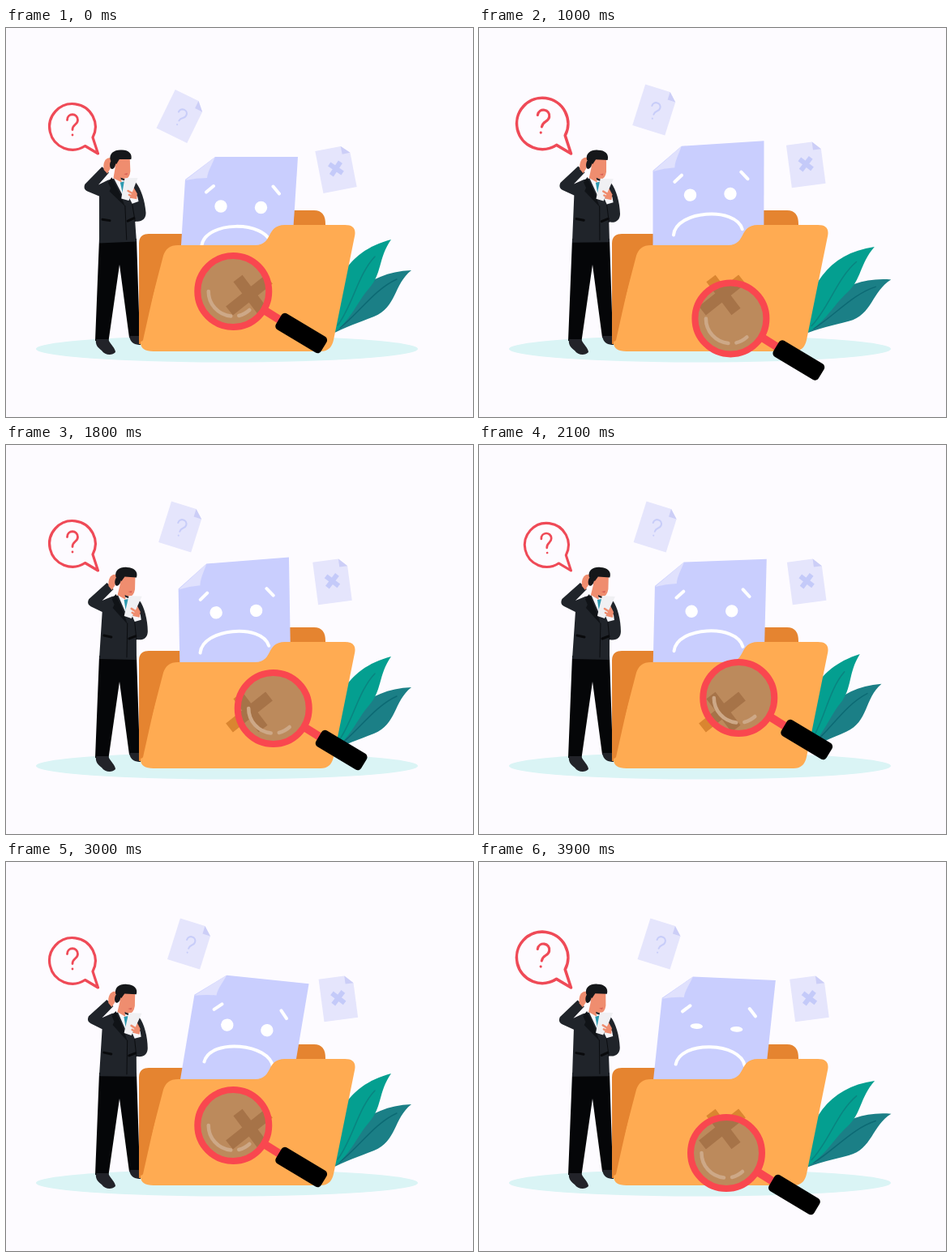
An HTML page for the animation above (4000 ms loop, 576x480 px).

```html
<!DOCTYPE html>
<html lang="en">
<head>
<meta charset="utf-8">
<title>File not found</title>
<style>
html, body { margin: 0; width: 100%; height: 100%; overflow: hidden; background: #fdfbff; }
svg { display: block; }
.line { fill: none; stroke-linecap: round; stroke-linejoin: round; }
</style>
</head>
<body>
<svg width="576" height="480" viewBox="0 0 576 480">
  <defs>
    <path id="question" class="line" d="M-6.5 -7C-6.5 -16 6.5 -16 6.5 -7C6.5 -1 0 -2 0 5M0 11.5h.01"/>
    <g id="sheet">
      <path fill="#e5e5fc" d="M-21 -26.5H11L21 -16.5V26.5H-21Z"/>
      <path fill="#cccef7" d="M11 -26.5V-16.5H21Z"/>
    </g>
  </defs>

  <ellipse cx="272.500" cy="396" rx="235.500" ry="16.5" fill="#daf4f5"/>

  <g id="bubble" class="line" stroke="#ef4a57" stroke-width="3.2">
    <path d="M97.500 145.500A28.300 28.300 0 1 1 107 135L113.5 155Z"/>
    <use id="doubt" href="#question" stroke-width="2.8"/>
  </g>

  <g id="leftSheet">
    <use href="#sheet"/>
    <use href="#question" transform="translate(0 2) scale(.8)" stroke="#c8cdf9" stroke-width="2.6"/>
  </g>
  <g id="rightSheet">
    <use href="#sheet"/>
    <path d="M-7 -7.500L7 6.500M7 -7.500L-7 6.500" stroke="#c4caf9" stroke-width="6"/>
  </g>

  <g id="leaves">
    <path fill="#1b7f86" d="M398 380C414 340 442 301 500 299C478 316 482 345 454 356C434 364 420 368 398 380Z"/>
    <path class="line" stroke="#0c6a74" stroke-width="1.5" d="M482 310C455 322 435 352 412 370"/>
    <path fill="#049f90" d="M398 380C398 320 418 276 475 261C459 284 464 303 448 321C432 339 424 365 398 380Z"/>
    <path class="line" stroke="#0a8480" stroke-width="1.5" d="M455 282C434 304 427 344 409 367"/>
  </g>

  <path fill="#050608" d="M115 260H161L165 382H152L140 292L126.500 386H110Z"/>
  <path fill="#222329" d="M111 384H126C129 391 135 395 135 400C131 404.500 122 404 118 398C113 394 110 391 111 384ZM152 380H166V391C160 391 153 389 152 380Z"/>
  <g id="torso">
    <path fill="#20242a" d="M125 170L102.500 190Q99.500 196 105 199L119 206L115 264L161 265L161 240C169 242 175 238 175 230C175 216 171 200 165 192L146 184L131 187L119 192L133 178Z"/>
    <path fill="#f6f6fa" d="M138 184L151 189L158 190L150 212Z"/>
    <path fill="#2c9ab0" d="M146 191L151 190L154 210L149 211Z"/>
    <path fill="#101317" d="M136 184L131 190L134 197L132 201L150 221L145 205Z"/>
    <path fill="#ef8d6f" d="M142 161H160L159.500 178Q158 187 152 187L147 185L148 191L138 185L141 173Z"/>
    <path fill="#d85f55" d="M151 181L156 180L155 182.500Z"/>
    <path fill="#ef8d6f" d="M127 174C126 165 130 158 137 160L135 173L131 179Z"/>
    <path fill="#15171a" d="M136 163C134 154 142 150 150 151C158 151 164 156 161.500 163.500L147 162.500L143 168Z"/>
    <ellipse cx="138.500" cy="167.500" rx="3.500" ry="6.500" transform="rotate(15 138.500 167.500)" fill="#15171a"/>
    <path fill="#f6f6fa" d="M156 211L166 209L167 216L159 218Z"/>
    <path fill="#ef8d6f" d="M156 198L161 196L166 206L165 213L157 211Z"/>
    <path fill="#f0f0f3" d="M152 186L168 187L161.500 201L155 214L146 211Z"/>
    <path class="line" stroke="#ef8d6f" stroke-width="2.500" d="M155 202L161 206M156 207L161 210"/>
    <path class="line" stroke="#090a0c" stroke-width="3" d="M121 235L130 237M152 239L160 236"/>
    <path class="line" stroke="#0b0d10" d="M150 220L149 262M159 219L161 240"/>
  </g>

  <path fill="#e58430" d="M164 390V266Q164 254 176 254H320L345 225H380Q394 225 394 242V300L210 390Z"/>

  <g id="page">
    <path fill="#c9cefe" d="M258 143H360L350 300H213L221 171Z"/>
    <path fill="#e0e1fd" d="M258 143C254 153 249 160 248 169Q235 169 221 172Z"/>
    <path class="line" stroke="#fff" stroke-width="4" d="M247 186.500L256 179M329.500 179.500L337 188.500M241.500 252C246 222 320 221 326.500 250"/>
    <g fill="#fff">
      <ellipse class="eye" cx="265" cy="204" rx="7.700"/>
      <ellipse class="eye" cx="314.500" cy="205.500" rx="7.700"/>
    </g>
  </g>

  <path fill="#ffab52" d="M182 399Q166 399 166 388L194 281Q198 268 212 268H307C330 268 320 243 344 243H418Q433 243 430 257L404 385Q401 399 388 399Z"/>
  <path fill="#e58430" d="M164 380V300L188 300L169 385Q166 390 164 380Z"/>
  <path fill="none" stroke="#da8530" stroke-width="14" d="M275.500 349L324.500 310M286 309L317 350"/>

  <g id="glass">
    <path stroke="#f9474f" stroke-width="10" d="M38 23L62 38"/>
    <rect x="66" y="-10.500" width="65" height="23" rx="5" transform="rotate(31)"/>
    <circle r="44" fill="#58586b" fill-opacity=".4" stroke="#f9474f" stroke-width="8"/>
    <path class="line" stroke="#cda887" stroke-width="4.500" d="M-30.500 0A30.500 30.500 0 0 0 -3 30.500M7 30A30.500 30.500 0 0 0 20 23"/>
  </g>
</svg>
<script>
const LOOP = 4000, STEP = 100, SETTLE = 600;
const place = (id, value) => document.getElementById(id).setAttribute('transform', value);
const mix = (a, b, u) => a + (b - a) * u;
const eyes = document.querySelectorAll('.eye');

function draw(t) {
  const turn = t * 2 * Math.PI / 3000;
  const pulse = Math.cos(turn - 0.6 * Math.PI) + 0.309;
  const settled = Math.sin(Math.min(1, t / SETTLE) * Math.PI / 2);
  const rock = t > SETTLE ? (t - SETTLE) / 3500 : 0;
  const sway = -Math.sin(rock * 2 * Math.PI);

  // The lens orbits while the bubble and leaves share one pulse
  const angle = 1.1 * Math.PI - turn;
  place('glass', `translate(${305 + 26 * Math.cos(angle)} ${333 + 26 * Math.sin(angle)})`);
  place('bubble', `translate(113.5 155) scale(${1 + 0.092 * pulse}) translate(-113.5 -155)`);
  place('doubt', `translate(82 120.5) rotate(${7 * pulse})`);
  place('leaves', `rotate(${5.1 * pulse} 404 377)`);

  // Papers rise into place, then rock
  place('page', `translate(0 ${16 * (1 - settled)}) rotate(${6 * sway + 0.4 * settled} 297 278)`);
  place('leftSheet', `translate(${mix(216, 221.3, settled) + 6.2 * sway} ${mix(109, 101, settled)}) rotate(${mix(26, 17.5, settled)})`);
  place('rightSheet', `translate(${mix(407, 406, settled) + 4.2 * sway} ${mix(174, 168.3, settled)}) rotate(${mix(-11, -7.5, settled)})`);

  const lean = mix(-4, -2.5, settled) + 2.5 * Math.sin(rock * Math.PI);
  place('torso', `rotate(${lean} 138 265)`);

  const sinceBlink = Math.min(Math.abs(t - 1275), Math.abs(t - 3835));
  const open = Math.max(0.1, Math.min(1, sinceBlink / 150));
  eyes.forEach(eye => eye.setAttribute('ry', 7.7 * open));
}

function tick() {
  const t = performance.now() % LOOP;
  draw(Math.floor(t / STEP) * STEP);
  requestAnimationFrame(tick);
}
tick();
</script>
</body>
</html>
```
